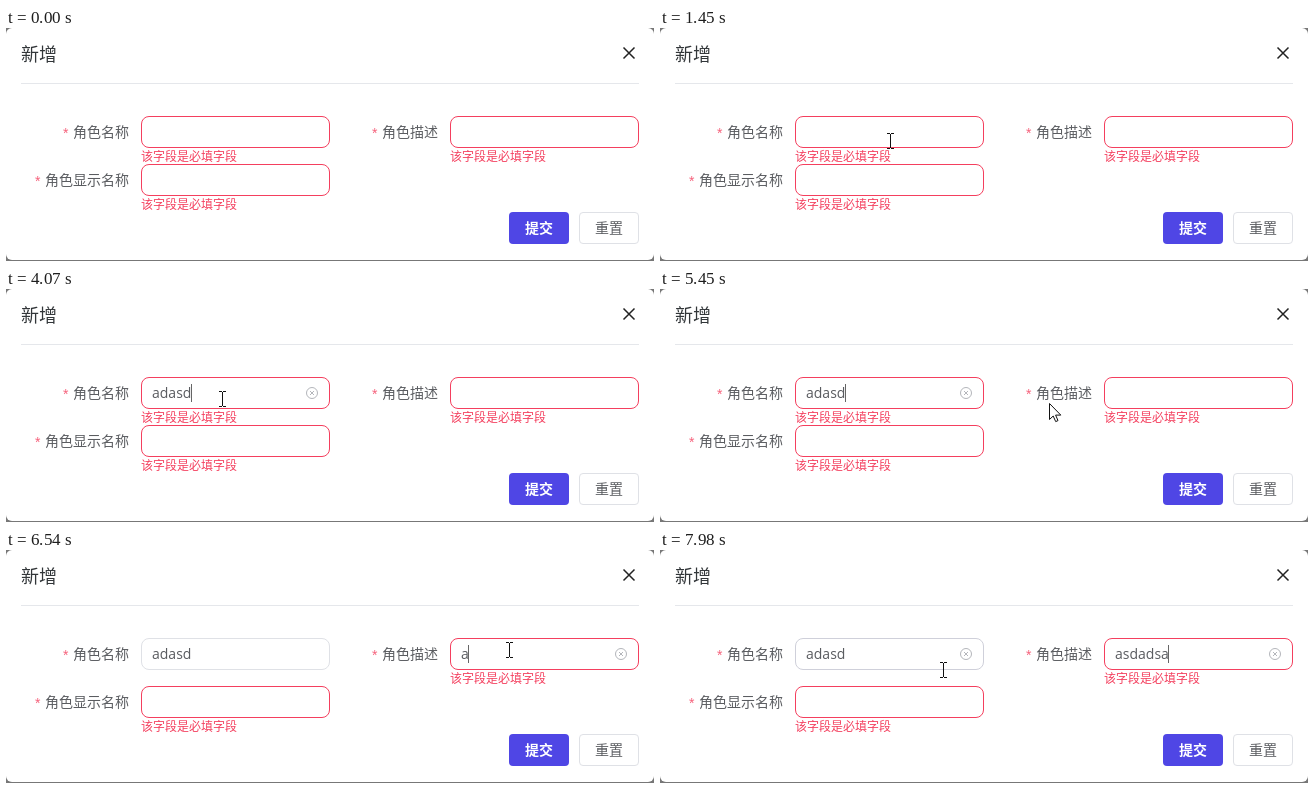
Recreate the animation shown at these times as an HTML page. Size 648 px wide and 233 px high, loop 8000 ms.

```html
<!DOCTYPE html>
<html lang="zh-CN">
<head>
<meta charset="utf-8">
<title>新增</title>
<style>
  html, body { margin: 0; width: 100%; height: 100%; overflow: hidden; background: #777; }
  svg { display: block; width: 648px; height: 233px; }
  text { font: 14px "Open Sans", "Noto Sans CJK SC", "Noto Sans CJK", sans-serif; fill: #5a5c60; }
  .title { font-size: 18px; fill: #323639; }
  .star { font: 14px "Liberation Sans", sans-serif; fill: #f6637d; }
  .error { font-size: 12px; fill: #f43f5e; }
  .box { fill: none; stroke: #f43f5e; }
  .submit { fill: #fff; font-weight: 600; }
  .clear { fill: none; stroke: #b4b6bb; }
</style>
</head>
<body>
<svg viewBox="0 0 648 233">
  <rect width="648" height="232" rx="6" fill="#fff"/>
  <text class="title" x="15" y="33">新增</text>
  <path d="M617.5 19.5l11 11m0-11l-11 11" fill="none" stroke="#222" stroke-width="1.5"/>
  <path d="M15 55.5H633" stroke="#e5e7eb"/>
  <g id="fields"></g>
  <rect x="503" y="184" width="60" height="32" rx="4" fill="#4f46e5"/>
  <text class="submit" x="519" y="205">提交</text>
  <rect x="573.5" y="184.5" width="59" height="31" rx="3.5" fill="#fff" stroke="#dfe1e6"/>
  <text x="589" y="205">重置</text>
  <rect id="caret" width="1" height="18" fill="#666"/>
  <path id="arrow" d="M-.5 .5V16.5L3.2 13L5.7 18.6L8 17.6L5.6 12.1H10.8Z" fill="#fff" stroke="#111" stroke-linejoin="round"/>
  <path id="beam" d="M-3-8h3v1h1v-1h3v1h-3v14h3v1h-3v-1h-1v1h-3v-1h3v-14h-3z" fill="#111"/>
</svg>
<script>
const LOOP = 8000, ENTER = 590, BLUR = 6030, HOVER = 7780;
const ADVANCE = { a: 7.79, s: 6.68, d: 8.58 };
const $ = id => document.getElementById(id);
const clamp = v => Math.max(0, Math.min(1, v));
const easeOut = (k, power) => 1 - (1 - k) ** power;

const fields = [
  { x: 135, y: 88, label: '角色名称', focus: [1730, BLUR],
    text: 'adasd', typing: [3280, 4070], rhythm: k => easeOut(k, 1.5) },
  { x: 444, y: 88, label: '角色描述', focus: [BLUR, LOOP],
    text: 'asdadsa', typing: [6540, 7860], rhythm: k => k ** 1.5 },
  { x: 135, y: 136, label: '角色显示名称', focus: [LOOP, LOOP], text: '' }
];

// Each move starts where the one before it ended
const moves = [
  { from: ENTER, until: 1390, to: [251, 125] },
  { from: 1390, until: 1820, to: [219, 107], power: 7 },
  { from: 1960, until: 2000, to: [216, 110] },
  { from: 5030, until: 5770, to: [509, 101], power: 1.07, sag: 10 },
  { from: 5910, until: 6000, to: [503, 100] },
  { from: 6960, until: 7760, to: [329, 113] },
  { from: HOVER, until: 7980, to: [283, 120] }
];

$('fields').innerHTML = fields.map(({ x, y, label }) => {
  const left = x - 12 - label.length * 14;
  return `
  <g>
    <text class="star" x="${left - 10}" y="${y + 22}">*</text>
    <text x="${left}" y="${y + 21}">${label}</text>
    <rect class="box" x="${x + .5}" y="${y + .5}" width="188" height="31" rx="7.5"/>
    <text class="value" x="${x + 11}" y="${y + 21}"></text>
    <g class="clear" transform="translate(${x + 171} ${y + 16})">
      <circle r="5.5"/><path d="M-2-2l4 4m0-4l-4 4"/>
    </g>
    <text class="error" x="${x}" y="${y + 44}" dy=".5">该字段是必填字段</text>
  </g>`;
}).join('');

[...$('fields').children].forEach((g, i) => {
  const f = fields[i];
  for (const name of ['box', 'value', 'clear', 'error']) f[name] = g.querySelector('.' + name);
  f.times = [...f.text].map((_, n) => {
    const [first, last] = f.typing;
    return first + (last - first) * f.rhythm(n / (f.text.length - 1));
  });
});

const show = (el, on) => el.setAttribute('visibility', on ? 'visible' : 'hidden');
const place = (el, x, y) => el.setAttribute('transform', `translate(${x} ${y})`);
const mix = (a, b, k) => `rgb(${a.map((v, i) => Math.round(v + (b[i] - v) * k))})`;

function pointerAt(t) {
  let x = 545, y = 232;
  for (const { from, until, to, power = 1, sag = 0 } of moves) {
    if (t < from) break;
    const k = easeOut(clamp((t - from) / (until - from)), power);
    x += (to[0] - x) * k;
    y += (to[1] - y) * k + sag * Math.sin(Math.PI * k);
  }
  return [Math.round(x), Math.round(y)];
}

function drawPointer(t) {
  const [x, y] = pointerAt(t);
  const visible = t >= ENTER;
  const overInput = fields.some(f => x >= f.x && x < f.x + 189 && y >= f.y && y <= f.y + 32);
  show($('arrow'), visible && !overInput);
  show($('beam'), visible && overInput);
  place($('arrow'), x, y);
  place($('beam'), x, y);
}

function drawFields(t) {
  let caretOn = false;
  fields.forEach((f, i) => {
    const count = f.times.filter(time => time <= t).length;
    const value = f.text.slice(0, count);
    const focused = t >= f.focus[0] && t < f.focus[1];
    f.value.textContent = value;
    show(f.clear, count && (focused || (i === 0 && t >= HOVER)));
    if (!focused) return;
    const width = [...value].reduce((sum, c) => sum + ADVANCE[c], 0);
    const since = t - (count ? f.times[count - 1] : f.focus[0]);
    caretOn = since % 1000 < 510;
    place($('caret'), f.x + 11 + Math.floor(width), f.y + 7);
  });
  show($('caret'), caretOn);
}

// The first field becomes valid when it loses focus
function drawValidation(t) {
  const red = [244, 63, 94], gray = [223, 225, 230], hovered = [207, 208, 218];
  const { box, error } = fields[0];
  const k = clamp((t - BLUR) / 300);
  box.style.stroke = t < HOVER ? mix(red, gray, k) : mix(gray, hovered, clamp((t - HOVER) / 200));
  error.style.opacity = 1 - k;
  place(error, 0, -4 * k);
}

const start = performance.now();
function draw() {
  const t = (performance.now() - start) % LOOP;
  drawFields(t);
  drawValidation(t);
  drawPointer(t);
  requestAnimationFrame(draw);
}
draw();
</script>
</body>
</html>
```
